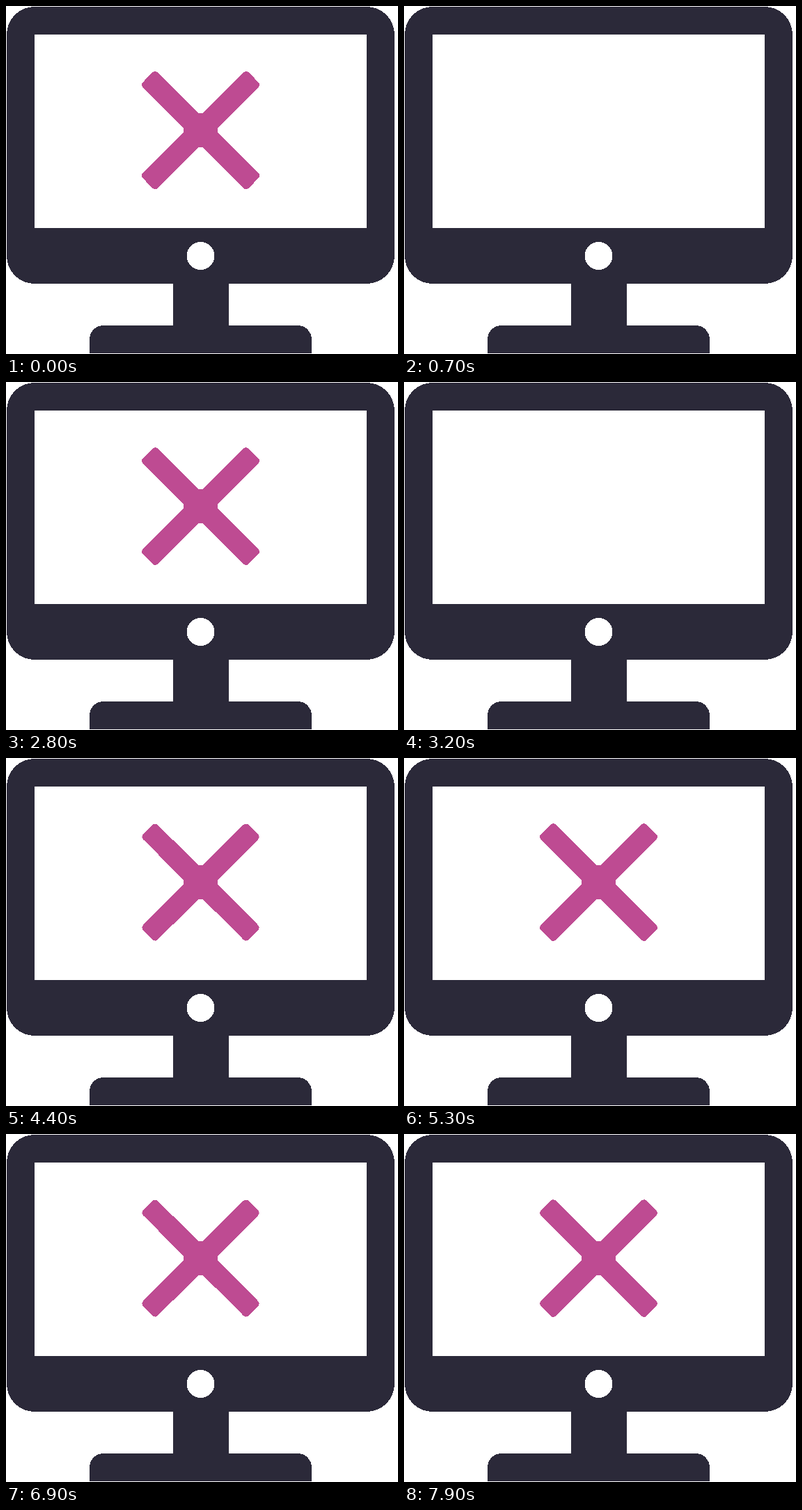
Recreate the animation shown at these times as an HTML page. Size 563 by 500 pixels, loop 8 s.

```html
<!DOCTYPE html>
<html lang="en">
<head>
<meta charset="utf-8">
<title>Blinking error screen</title>
<style>
  html, body { margin: 0; width: 100%; height: 100%; overflow: hidden; background: #fff; }
  svg { display: block; width: 563px; height: 500px; }
</style>
</head>
<body>
<svg viewBox="0 0 563 500">
  <!-- Hard-edged alpha: below half vanishes, the rest is solid colour -->
  <filter id="hard" filterUnits="userSpaceOnUse" x="180" y="80" width="200" height="200"
          color-interpolation-filters="sRGB">
    <feComponentTransfer in="SourceAlpha" result="mask">
      <feFuncA type="discrete" tableValues="0 1"/>
    </feComponentTransfer>
    <feFlood flood-color="#be4b92"/>
    <feComposite in2="mask" operator="in"/>
  </filter>

  <g fill="#2b2939" shape-rendering="crispEdges">
    <rect x="1" y="1" width="557" height="398" rx="40"/>
    <rect x="240" y="398" width="80" height="62"/>
    <path d="M120 499V479A20 20 0 0 1 140 459H419A20 20 0 0 1 439 479V499Z"/>
    <rect x="41" y="41" width="477" height="278" fill="#fff"/>
    <circle cx="279.5" cy="359" r="20" fill="#fff"/>
  </g>

  <g filter="url(#hard)">
    <g id="cross">
      <g transform="translate(279.5 178.5)">
        <rect x="-107.5" y="-15.3" width="215" height="30.6" rx="5.5" transform="rotate(45)"/>
        <rect x="-107.5" y="-15.3" width="215" height="30.6" rx="5.5" transform="rotate(-45)"/>
        <rect x="-24.8" y="-24.8" width="49.6" height="49.6"/>
      </g>
    </g>
  </g>
</svg>
<script>
  const LOOP = 8000, PERIOD = 2500, STEP = 100;
  const cross = document.getElementById('cross');
  const start = performance.now();

  // Triangle-wave fade, brightest at time 0
  function draw() {
    const t = (performance.now() - start) % LOOP;
    const phase = Math.floor(t / STEP) * STEP % PERIOD;
    const fade = Math.abs(1 - 2 * phase / PERIOD);
    cross.setAttribute('opacity', fade);
    requestAnimationFrame(draw);
  }
  draw();
</script>
</body>
</html>
```
